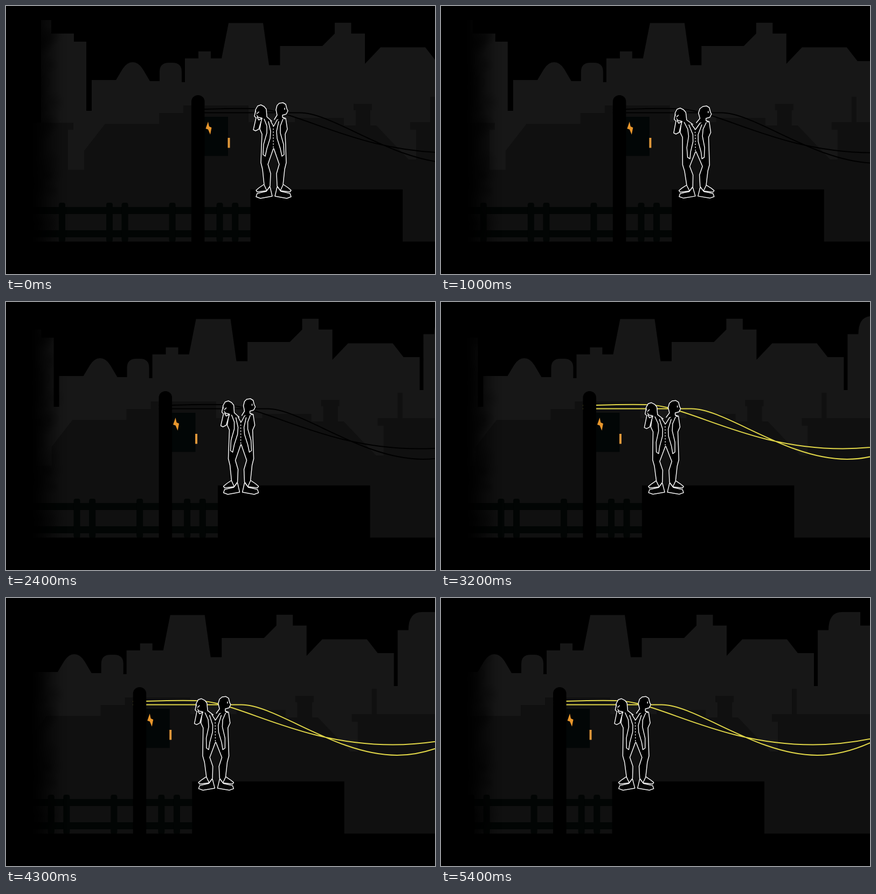
Write an HTML page with a canvas that moves like this. It is 796x496 px and loops after 5.5 s.

```html
<!DOCTYPE html>
<html lang="en">
<head>
<meta charset="utf-8">
<title>Night street</title>
<style>
  html, body { margin: 0; width: 100%; height: 100%; overflow: hidden; background: #000; }
  canvas { display: block; width: 796px; height: 496px; }
</style>
</head>
<body>
<canvas id="stage" width="796" height="496"></canvas>
<script>
const ctx = document.getElementById('stage').getContext('2d');
const LOOP = 5500, STEP = 100, SPEED = 2.518, WIRES_ON = 2800;
const POSES = [0, 0.55, 1, 0.55], POSE_STEPS = 6, POSE_START = 2;
const AXIS = 496.5;

const skyline = new Path2D(`M65 440V26H84V51H126V66H149V194H159V137H204
  L216 117Q224 104 235 104T254 117L267 139H285V122Q285 105 302 105H309Q326 105 326 122V141H332V97H357V84H380V97H400
  L413 31.5H477L488 109.5H508.5V74H587L610 51V31H640.5V51H666V107L695 76.5H778L798 102H828V163H835V59.5H855
  Q855 26 880 26H914V51H960V440Z`);
const houses = new Path2D(`M-10 440V216H125V229H115V303H145V268L184 218H284V198H329V184H450V215H536V207H627V221H649
  V193H645V181H679V193H676V221H687L747 284H761V229H750V215H787V168H796V215H960V440Z`);
const wires = new Path2D(`M344 191.5L369 191Q430 189 461 190C540 190 650 271.5 826 271.5Q886 271.5 945 258
  M344 197.5H545C610 197.5 720 291 834 291Q886 291 945 262`);
const bolt = new Path2D('M375 214L370.5 227L375 228.5L379 238L381.5 225L377 223Z');

// Slumping sinks the upper body, spreads it from the axis and tucks the hands in.
function slump(x, y, k, tuck) {
  const u = (y - 180) / 170, off = x - AXIS;
  const spread = 4 * (1 - u) * Math.max(-1, Math.min(1, off / 10));
  const reach = tuck * Math.sign(off) * Math.max(0, (y - 207) / 70);
  return [x + k * (3 * u + spread - reach), y + k * 6 * Math.min(1, (350 - y) / 90)];
}

function shape(points, { mirror = false, fill = true, tuck = 0 } = {}) {
  const p = points.split(' ').map(Number);
  return k => {
    ctx.beginPath();
    for (let i = 0; i < p.length; i += 2)
      ctx.lineTo(...slump(mirror ? 2 * AXIS - p[i] : p[i], p[i + 1], k, tuck));
    if (fill) ctx.fill();
    ctx.stroke();
  };
}

const pair = (points, options) =>
  [false, true].map(mirror => shape(points, { ...options, mirror }));

const seam = shape('496 222 496 262', { fill: false });
const figure = [
  ...pair('479 330 470 336 464 341 466 344 483 342'),
  shape('518 270 516 285 511 318', { fill: false }),
  ...pair('496 222 490 211 483 205 474 208 471 228 475 237 474 262 473 290 476 302 479 331 484 342 490 333 491 310 486 293 496 264'),
  ...pair('489 335 483 343 474 345 466 347 464 353 472 356 494 352 490 335'),
  ...pair('479 209 484 222 484 235 478 256 477 275 481 278 484 264 490 245 491 232 487 214', { tuck: 6 }),
  shape('493 213 484 205 483 191 479 186 473 183 467 185 463 192 464 201 468 206 474 207'),
  shape('498 210 503 202 501 192 503 184 507 180 514 179 519 182 521 190 523 194 520 200 513 202 513 206 517 209'),
  shape('463 194 461 204 464 207 459 229 463 231 469 228 475 208 469 211 466 206'),
  shape('466 199 469 196', { fill: false }),
  shape('517 189 517 191.5', { fill: false })
];

function couple(k) {
  ctx.fillStyle = '#000';
  ctx.strokeStyle = '#f4f4f4';
  ctx.lineWidth = 1.5;
  ctx.lineJoin = ctx.lineCap = 'round';
  figure.forEach(draw => draw(k));
  ctx.setLineDash([1, 4.5]);
  seam(k);
  ctx.setLineDash([]);
}

function rect(color, x, y, w, h, r = 0) {
  ctx.fillStyle = color;
  ctx.beginPath();
  ctx.roundRect(x, y, w, h, r);
  ctx.fill();
}

function fill(color, path) {
  ctx.fillStyle = color;
  ctx.fill(path);
}

function fence() {
  const color = '#020504';
  const post = x => rect(color, x, 364, 12, 73, 4);
  for (const y of [372, 415]) rect(color, -20, y, 474, 13);
  // Single posts alternate with pairs.
  for (let i = 0; i < 4; i++) {
    const x = 98 + 102.3 * i;
    if (i % 2) { post(x - 14.3); post(x + 14.3); } else post(x);
  }
}

// Still smoke along the left edge, built once.
function makeSmoke() {
  const layer = document.createElement('canvas');
  layer.width = 160;
  layer.height = 496;
  const s = layer.getContext('2d');
  const fade = s.createLinearGradient(40, 0, 114, 0);
  for (let t = 0; t <= 1; t += 0.125)
    fade.addColorStop(t, `rgba(0,0,0,${1 - t * t * (3 - 2 * t)})`);
  s.fillStyle = fade;
  s.fillRect(0, 0, 160, 496);
  let seed = 7;
  const rnd = () => (seed = seed * 16807 % 2147483647) / 2147483647;
  for (let i = 0; i < 40; i++) {
    const x = 45 + rnd() * 45, y = rnd() * 450, r = 10 + rnd() * 18;
    const puff = s.createRadialGradient(x, y, 0, x, y, r);
    puff.addColorStop(0, 'rgba(0,0,0,.2)');
    puff.addColorStop(1, 'rgba(0,0,0,0)');
    s.fillStyle = puff;
    s.fillRect(x - r, y - r, 2 * r, 2 * r);
  }
  return layer;
}
const smoke = makeSmoke();

function draw(time) {
  const step = Math.floor(time % LOOP / STEP);
  const pose = POSES[Math.floor((step + POSE_START) / POSE_STEPS) % POSES.length];

  ctx.fillStyle = '#000';
  ctx.fillRect(0, 0, 796, 496);
  ctx.save();
  ctx.translate(-step * SPEED, 0);
  fill('#171717', skyline);
  fill('#101010', houses);
  fence();
  rect('#000', 453.5, 339.5, 282.5, 98);
  rect('#000', -20, 436, 1000, 60);

  ctx.lineWidth = 2;
  ctx.strokeStyle = step * STEP < WIRES_ON ? '#000' : '#dfd548';
  ctx.stroke(wires);

  rect('#020606', 368, 205, 44, 72.5);
  rect('#000', 344, 165, 24.5, 290, 12);
  rect('#e0983a', 411.5, 244, 4, 18.5);
  fill('#e8962c', bolt);
  couple(pose);
  ctx.restore();
  ctx.drawImage(smoke, 0, 0);
}

const start = performance.now();
function tick() {
  draw(performance.now() - start);
  requestAnimationFrame(tick);
}
tick();
</script>
</body>
</html>
```
